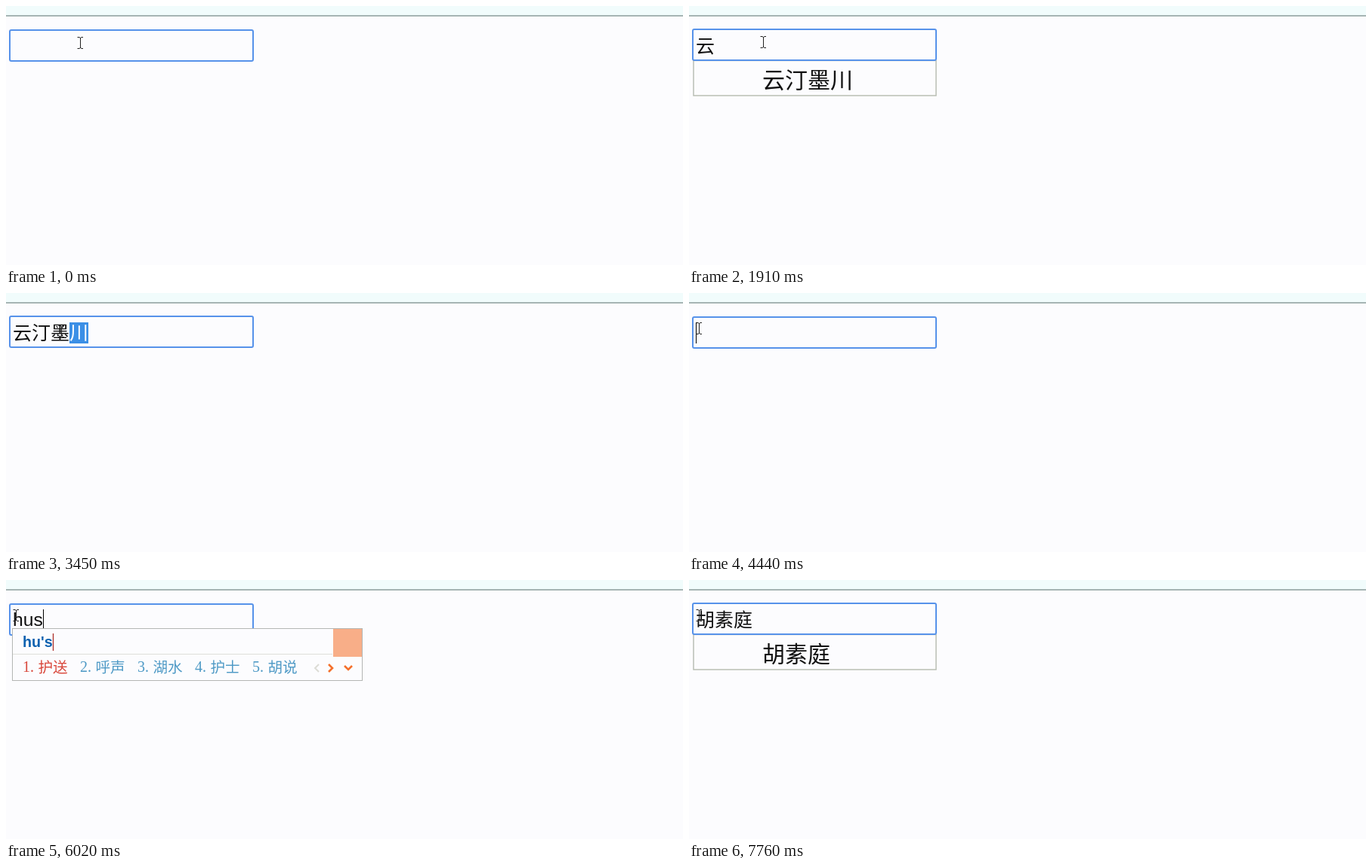
An HTML page for the animation above (8 s loop, 896 px wide and 344 px high).

```html
<!DOCTYPE html>
<html lang="zh-CN">
<head>
<meta charset="utf-8">
<style>
  html, body { margin: 0; width: 100%; height: 100%; overflow: hidden; background: #fcfcfe; }
  svg { display: block; width: 896px; height: 344px; }
  text { white-space: pre; }
  .hanzi { font-family: "Noto Sans CJK SC", "Noto Sans CJK", sans-serif; }
  .latin { font-family: "Liberation Sans", Arial, sans-serif; }
  .num { font-family: "Liberation Serif", serif; }
</style>
</head>
<body>
<svg viewBox="0 0 896 344">
  <rect width="896" height="13" fill="#f1fcfc"/>
  <rect y="12" width="896" height="2" fill="#a6b4b4"/>
  <g id="page"></g>
  <g id="ime"></g>
  <path id="mouse" fill="none" stroke="#222" d="M-3.5 -7.5H-1L.5 -6.5L2 -7.5H4M.5 -7V7M-3.5 7.5H-1L.5 6.5L2 7.5H4"/>
</svg>
<script>
const LOOP = 8000;
const PAPER = "#fcfcfe", BLUE = "#5692ea", ORANGE = "#f4702c";
const FIRST = "#d9483c", OTHER = "#4f9ac6", USER = "#0a78d8";
const LATIN = 24.7, HANZI = 25, LEFT = 9;

// time, field text, composition, candidates (~ cloud, @ user word)
const STEPS = [
  [0, ""],
  [460, "y", "y", "一 有 要 也 用"],
  [700, "yu", "yu", "与 于 鱼 雨 语"],
  [960, "yun", "yun", "云 运 晕 允 云彩"],
  [1290, "云"],
  [2700, "云汀墨川"],
  [4440, ""],
  [4650, "h", "h", "和 会 好 还 很"],
  [4900, "hu", "h", "和 会 好 还 很"],
  [5230, "hu", "hu", "湖 护 呼 虎 胡"],
  [5900, "hus", "hu's", "护送 呼声 湖水 护士 胡说"],
  [6200, "husu", "hu'su", "湖塑 胡素 护宿 呼诉 湖素"],
  [6440, "husut", "hu'su't", "湖塑~ 胡素体 护宿台 呼诉 湖素"],
  [6610, "husuti", "hu'suti", "湖塑~ 胡素体~ 护宿提 湖素提@ 湖素"],
  [6770, "husutin", "hu'sutin", "胡素庭@ 湖塑亭~ 护宿 湖素"],
  [6860, "husuting", "hu'suting", "胡素庭@ 湖塑亭~ 护宿 湖素"],
  [6950, "胡素庭"],
];
const CARET = [[120, 1330], [4440, 7140]];
const SUGGEST = [[1870, 2780, "云汀墨川"], [7520, LOOP, "胡素庭"]];
const DRAG = [3300, 4440];
const MOUSE = [
  [0, 98, 49], [1659, 98, 49], [1660, 98, 48], [2240, 98, 48], [2620, 104, 97],
  [2990, 104, 97], [3240, 112, 53], [3380, 110, 52], [3450, 73, 51],
  [3820, 14, 48], [4029, 14, 48], [4030, 13, 47], [LOOP, 13, 47],
];

const $ = id => document.getElementById(id);
const pen = document.createElement("canvas").getContext("2d");
const isLatin = s => /^[a-z']*$/.test(s);
const during = (t, [from, to]) => t >= from && t < to;

function width(s, font) {
  pen.font = font + ' "Liberation Sans", Arial, sans-serif';
  return pen.measureText(s).width;
}
function text(s, x, y, size, cls, fill = "#111", extra = "") {
  return `<text x="${x}" y="${y}" font-size="${size}" class="${cls}" fill="${fill}" ${extra}>${s}</text>`;
}
function rect(x, y, w, h, fill, extra = "") {
  return `<rect x="${x}" y="${y}" width="${w}" height="${h}" fill="${fill}" ${extra}/>`;
}
function line(d, stroke, w = 1) {
  return `<path d="${d}" fill="none" stroke="${stroke}" stroke-width="${w}"/>`;
}

function field(value, caret, picked, hint) {
  const latin = isLatin(value), top = latin ? 31 : 30;
  let out = "";
  if (hint) {
    out += rect(6, 72.5, 321, 46.5, PAPER, 'stroke="#b6bbb0" stroke-width="1.4"');
    out += text(hint, 97, 109, 30, "hanzi");
  }
  out += rect(5, top + 1, 322, 41, PAPER, `rx="2" stroke="${BLUE}" stroke-width="2"`);
  if (latin) {
    out += text(value, LEFT, 61, LATIN, "latin");
  } else {
    const keep = value.length - picked, split = LEFT + keep * HANZI;
    out += text(value.slice(0, keep), LEFT, 61.5, HANZI, "hanzi");
    if (picked) {
      out += rect(split, 39, picked * HANZI, 28, "#3b8fe6");
      out += text(value.slice(keep), split, 61.5, HANZI, "hanzi", "#fff");
    }
  }
  if (caret) {
    const end = latin ? width(value, LATIN + "px") : value.length * HANZI;
    out += rect(Math.round(LEFT + end), 39, 1, 28, "#000");
  }
  return out;
}

function badge(kind, x, color) {
  if (kind === "~")
    return line(`M${x + 4} 115C${x - 1} 114 ${x} 108 ${x + 4} 109C${x + 6} 104 ${x + 12} 106 ${x + 12} 109C${x + 17} 110 ${x + 16} 115 ${x + 11} 115Z`, color, 1.3)
      + `<circle cx="${x + 8}" cy="111.5" r="2.2" fill="none" stroke="${color}"/>`;
  return `<circle cx="${x + 6}" cy="108" r="3" fill="${USER}"/>`
    + `<path d="M${x} 116Q${x} 111 ${x + 6} 111T${x + 12} 116Z" fill="${USER}"/>`;
}

function popup(comp, list) {
  if (!comp) return "";
  let x = 22, row = "", end = 0;
  list.split(" ").forEach((item, i) => {
    const word = item.replace(/[~@]/, ""), mark = item.slice(word.length);
    const color = i ? OTHER : FIRST;
    row += text(i + 1 + ".", x, 122, 20, "num", color);
    row += text(word, x + 20.5, 122.5, 19.6, "hanzi", color, 'font-weight="300"');
    x += 20 + word.length * 20;
    if (mark) {
      row += badge(mark, x, color);
      x += mark === "~" ? 15 : 11;
    }
    end = x;
    x += 16;
  });
  const right = end + 85;
  const cx = Math.round(22 + width(comp, "bold 19.7px")) + 0.5;
  return rect(8.5, 64.5, right - 8, 69, PAPER, 'stroke="#b4b6b4"')
    + line(`M9 98.5H${right - 39}`, "#dedfda")
    + text(comp, 22, 89, 19.7, "latin", "#0e62b0", 'font-weight="700"')
    + line(`M${cx} 71V94`, "#b03a34", 1.4)
    + row
    + rect(right - 38, 65, 38, 37, "#f8ae88")
    + line(`M${right - 57} 112L${right - 62} 117L${right - 57} 122`, "#dcdcd6", 2)
    + line(`M${right - 44} 112L${right - 39} 117L${right - 44} 122`, ORANGE, 2.6)
    + line(`M${right - 23} 114L${right - 18} 119L${right - 13} 114`, ORANGE, 2.6);
}

function pointer(t) {
  const i = MOUSE.findIndex(k => k[0] > t);
  const a = MOUSE[i - 1], b = MOUSE[i], p = (t - a[0]) / (b[0] - a[0]);
  return [1, 2].map(n => Math.round(a[n] + (b[n] - a[n]) * p));
}

let last = "";
function draw(t) {
  const [, value, comp = "", list = ""] = STEPS.findLast(s => s[0] <= t);
  const [mx, my] = pointer(t);
  const caret = CARET.some(c => during(t, c));
  const hint = (SUGGEST.find(s => during(t, s)) || [])[2] || "";
  const edge = LEFT + value.length * HANZI;
  const picked = during(t, DRAG)
    ? Math.max(0, Math.min(value.length, Math.round((edge - mx) / HANZI))) : 0;

  $("mouse").setAttribute("transform", `translate(${mx} ${my})`);
  const key = [value, comp, list, caret, picked, hint].join("|");
  if (key === last) return;
  last = key;
  $("page").innerHTML = field(value, caret, picked, hint);
  $("ime").innerHTML = popup(comp, list);
}

const start = performance.now();
function tick() {
  draw((performance.now() - start) % LOOP);
  requestAnimationFrame(tick);
}
tick();
</script>
</body>
</html>
```
